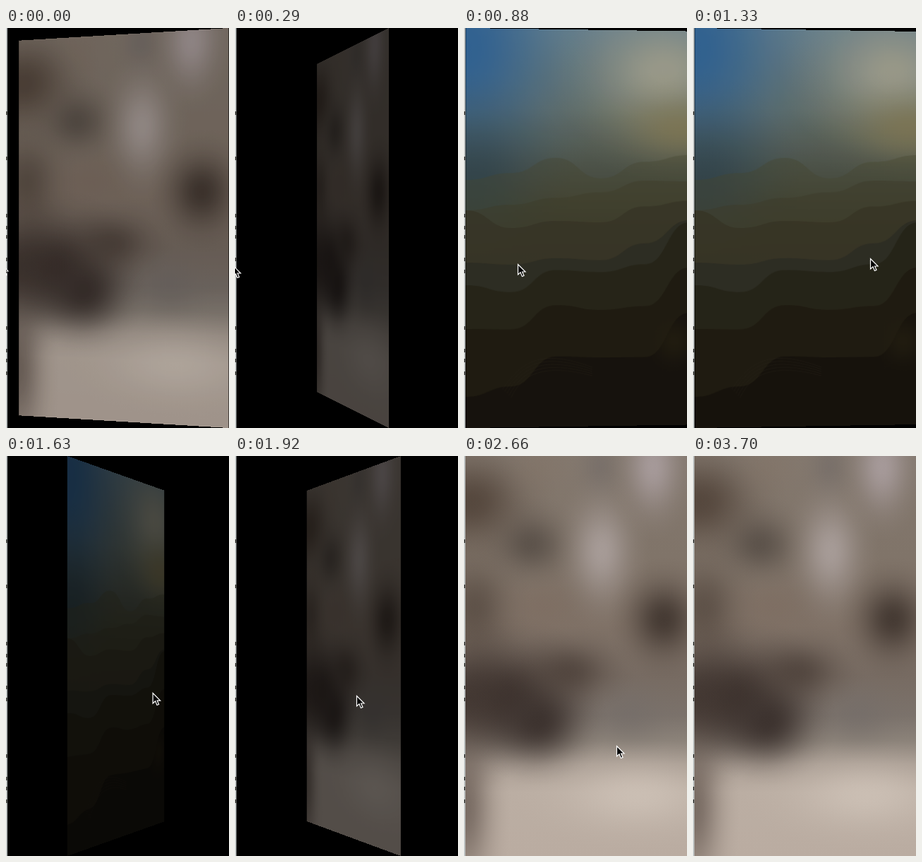
Write an HTML page with a canvas that moves like this. It is 316 px wide and 566 px high and loops after 3740 ms.

```html
<!DOCTYPE html>
<html lang="en">
<head>
<meta charset="utf-8">
<title>Card flip</title>
<style>
html, body { margin: 0; width: 100%; height: 100%; overflow: hidden; background: #000; }
canvas { display: block; }
</style>
</head>
<body>
<canvas id="stage" width="316" height="566"></canvas>
<script>
const W = 316, H = 566, LOOP = 3740;
const HALF = 160, MID = 162, DEPTH = 1360;
const ctx = document.getElementById('stage').getContext('2d');

const TICKS = [0, 150, 290, 440, 580, 730, 880, 1030, 1180, 1330, 1480, 1630,
  1780, 1920, 2070, 2210, 2360, 2510, 2660, 2800, 2950, 3100];

// time, degrees
const TURN = [[0, 16.5], [150, 42], [290, 69.5], [580, 126.7], [730, 151.8], [880, 176],
  [1030, 180], [1180, 180], [1330, 175.6], [1480, 148.2], [1630, 118], [1920, 62.9],
  [2070, 38.6], [2210, 12.6], [2360, 0]];

// time, x, y
const POINTER = [[0, -8, 333], [290, -3, 336], [440, 35, 337], [580, 82, 338], [1030, 73, 332],
  [1180, 78, 332], [1330, 251, 326], [1480, 226, 333], [1920, 172, 339], [2210, 162, 339],
  [2360, 162, 338], [2510, 162, 323], [2660, 216, 410], [2800, 274, 512], [2950, 274, 520]];

function at(keys, t, i) {
  const n = keys.findIndex(k => k[0] > t);
  if (n < 0) return keys[keys.length - 1][i];
  const a = keys[n - 1], b = keys[n];
  return a[i] + (b[i] - a[i]) * (t - a[0]) / (b[0] - a[0]);
}

function face(stops, paint) {
  const c = document.createElement('canvas');
  c.width = HALF * 2;
  c.height = H;
  const g = c.getContext('2d');
  const base = g.createLinearGradient(0, 0, 0, H);
  stops.forEach(([p, color]) => base.addColorStop(p, color));
  g.fillStyle = base;
  g.fillRect(0, 0, c.width, H);
  paint(g);
  return c;
}

function blob(g, x, y, rx, ry, rgb, alpha) {
  const grad = g.createRadialGradient(0, 0, 0, 0, 0, 1);
  for (let i = 0; i <= 10; i++) {
    const r = i / 10;
    const a = alpha * (Math.exp(-3.5 * r * r) - Math.exp(-3.5)) / (1 - Math.exp(-3.5));
    grad.addColorStop(r, `rgba(${rgb},${a})`);
  }
  g.save();
  g.translate(x - 2, y);
  g.scale(rx, ry);
  g.fillStyle = grad;
  g.fillRect(-1, -1, 2, 2);
  g.restore();
}

// Fills everything below a smooth line through evenly spaced heights.
function ridge(g, ys, color) {
  const step = HALF * 2 / (ys.length - 1);
  g.beginPath();
  g.moveTo(0, ys[0]);
  for (let i = 1; i < ys.length; i++) {
    const x = i * step, m = x - step / 2;
    g.bezierCurveTo(m, ys[i - 1], m, ys[i], x, ys[i]);
  }
  g.lineTo(HALF * 2, H);
  g.lineTo(0, H);
  g.fillStyle = color;
  g.fill();
}

const front = face([[0, '#83786e'], [.25, '#807469'], [.42, '#7f7166'], [.55, '#776b62'],
  [.65, '#7b726b'], [.71, '#8b8279'], [.77, '#a99d93'], [.84, '#bbaea3'], [1, '#baaca1']], g => {
  blob(g, 10, 65, 125, 105, '78,64,54', .85);
  blob(g, 95, 125, 80, 70, '82,73,66', .75);
  blob(g, 15, 215, 85, 110, '84,72,63', .75);
  blob(g, 105, 15, 65, 70, '130,115,102', .45);
  blob(g, 193, 15, 45, 70, '116,108,104', .6);
  blob(g, 268, 15, 62, 105, '167,155,155', .95);
  blob(g, 195, 135, 70, 115, '168,157,153', .95);
  blob(g, 112, 212, 85, 60, '126,109,97', .6);
  blob(g, 235, 365, 75, 65, '116,109,105', .6);
  blob(g, 283, 231, 80, 88, '70,59,52', 1);
  blob(g, 65, 340, 135, 115, '65,54,49', 1);
  blob(g, 5, 350, 110, 125, '60,49,44', .85);
  blob(g, 105, 375, 100, 92, '61,51,47', 1);
  blob(g, 150, 305, 95, 65, '77,65,58', .8);
  blob(g, 2, 495, 65, 190, '105,92,84', .8);
  blob(g, 245, 480, 175, 80, '205,193,182', .85);
});

const back = face([[0, '#6d8590'], [.2, '#66726c'], [.34, '#50564c'], [.45, '#434536'],
  [.55, '#343329'], [.7, '#292419'], [1, '#15110b']], g => {
  blob(g, 0, 25, 210, 280, '48,100,150', .95);
  blob(g, 15, 220, 140, 160, '46,66,74', .7);
  blob(g, 285, 60, 165, 130, '161,160,143', .95);
  blob(g, 312, 140, 155, 85, '133,122,82', .75);
  ridge(g, [215, 205, 183, 212, 188, 178], 'rgba(73,72,49,.38)');
  ridge(g, [258, 250, 240, 232, 215, 216], 'rgba(62,60,42,.45)');
  ridge(g, [258, 283, 273, 275, 252, 244], 'rgba(56,53,38,.72)');
  ridge(g, [332, 335, 326, 329, 305, 272], 'rgba(45,44,35,.75)');
  ridge(g, [364, 374, 343, 346, 335, 275], 'rgba(40,37,25,.95)');
  ridge(g, [426, 427, 393, 400, 395, 340], '#201c12');
  ridge(g, [522, 508, 466, 468, 468, 405], '#17130d');
  blob(g, 300, 445, 50, 55, '36,31,18', .8);
  g.strokeStyle = 'rgba(46,42,33,.35)';
  g.lineWidth = 1;
  for (let i = 0; i < 5; i++) {
    g.beginPath();
    g.moveTo(52 + i * 3, 512 + i * 3);
    g.bezierCurveTo(80, 470 + i * 5, 110, 455 + i * 5, 180, 482 + i * 3);
    g.stroke();
  }
});

function drawCard(deg) {
  const flipped = deg > 90;
  const tilt = flipped ? 180 - deg : deg;
  const img = flipped ? back : front;
  const dir = flipped ? -1 : 1;
  if (tilt < .1) {
    ctx.drawImage(img, 2, 0);
    return;
  }
  const a = tilt * Math.PI / 180;
  const near = HALF * Math.cos(a);
  const d = HALF * Math.sin(a) / DEPTH;
  const far = near / (1 + 2 * d);
  const left = MID - (flipped ? near : far);
  const right = MID + (flipped ? far : near);
  for (let x = Math.floor(left); x < right && x < W; x++) {
    const x0 = Math.max(x, left), x1 = Math.min(x + 1, right);
    const off = ((x0 + x1) / 2 - MID) * dir;
    const u = off * (1 + d) / (near + d * off);
    const h = H / (1 + d * (1 - u));
    const sx = Math.max(0, Math.min(HALF * 2 - 1, HALF + HALF * u * dir - .5));
    ctx.drawImage(img, sx, 0, 1, H, x0, (H - h) / 2, x1 - x0, h);
  }
  ctx.fillStyle = `rgba(0,0,0,${tilt / 114})`;
  ctx.fillRect(0, 0, W, H);
}

function drawEdge() {
  ctx.fillStyle = '#bfc3c2';
  ctx.fillRect(0, 0, 2, H);
  ctx.fillStyle = '#33332f';
  for (const y of [118, 182, 263, 280, 293, 325, 342, 422, 454, 468, 486]) ctx.fillRect(0, y, 1.5, 5);
}

const arrow = new Path2D('M.5 .5V15L4 11.8L6.4 17.5L9 16.4L6.6 11H11Z');

function drawPointer(x, y) {
  ctx.save();
  ctx.translate(x, y);
  ctx.fillStyle = '#000';
  ctx.strokeStyle = '#fff';
  ctx.lineWidth = 1.2;
  ctx.fill(arrow);
  ctx.stroke(arrow);
  ctx.restore();
}

function render(now) {
  const time = now % LOOP;
  const t = TICKS.filter(k => k <= time).pop() || 0;
  ctx.fillStyle = '#000';
  ctx.fillRect(0, 0, W, H);
  drawCard(at(TURN, t, 1));
  drawEdge();
  if (t < 3100) drawPointer(at(POINTER, t, 1), at(POINTER, t, 2));
}

const start = performance.now();
function loop() {
  render(performance.now() - start);
  requestAnimationFrame(loop);
}
loop();
</script>
</body>
</html>
```
